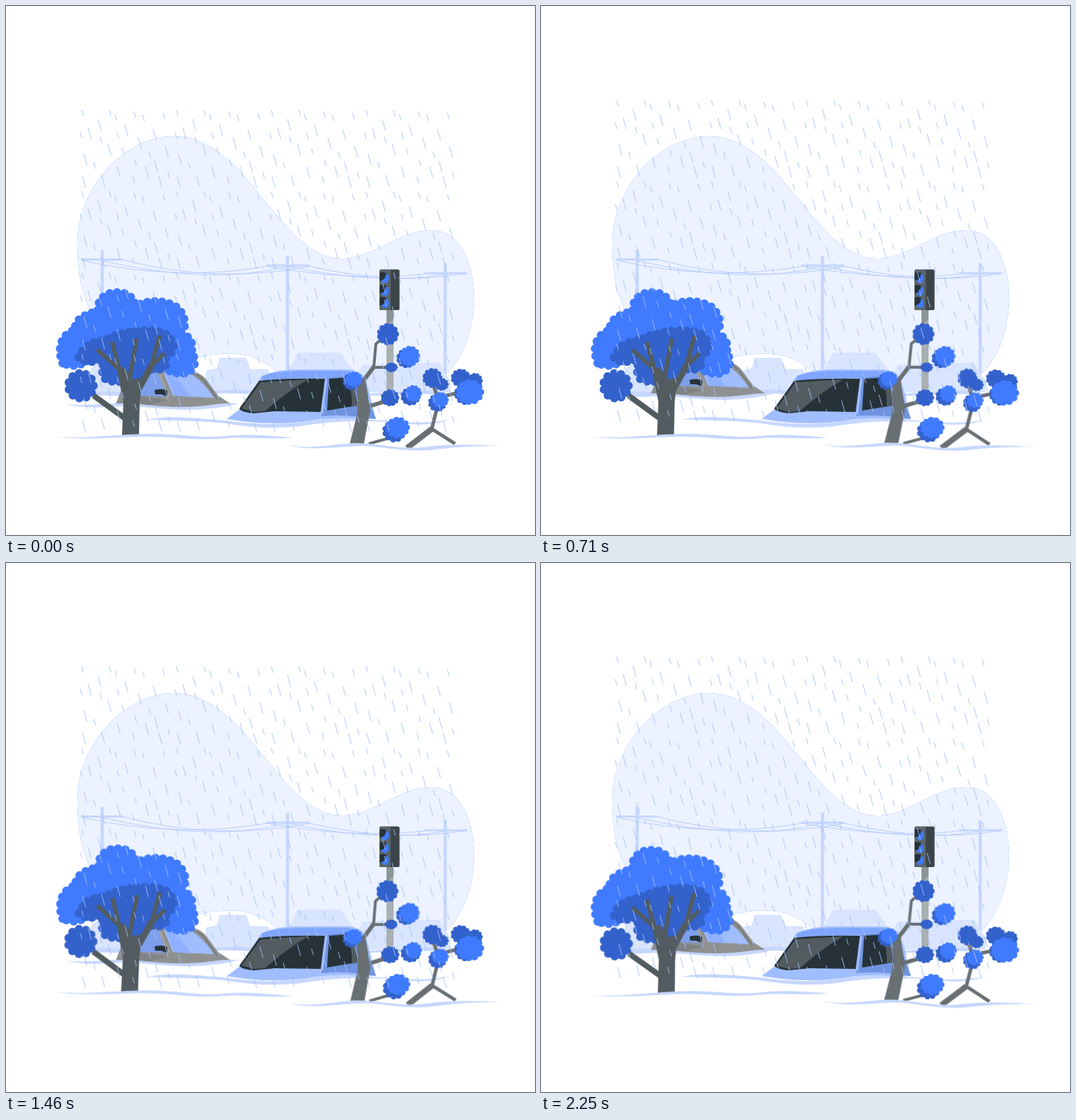
Recreate the animation shown at these times as an HTML page without scripts. Size 748x748 px, loop 2.29 s.

```html
<!DOCTYPE html>
<html lang="en">
<head>
<meta charset="utf-8">
<title>Flooded street in the rain</title>
<style>
html, body { margin: 0; width: 100%; height: 100%; overflow: hidden; background: #fff; }
svg { display: block; width: 100vw; height: 100vh; }

.float, .sway { animation: 2290ms linear infinite; }
.float { animation-name: float; }
.car { animation-name: sway-now; transform-origin: 411px 551px; }
.shrubs { animation-name: sway-soon; transform-origin: 549px 540px; }
.tree { animation-name: sway-late; transform-origin: 239px 507px; }

/* 1500 ms cycles, cut off by the 2290 ms loop */
@keyframes float {
  0%, 65.502% { transform: translateY(0); }
  32.751%, 98.253% { transform: translateY(-15px); }
  100% { transform: translateY(-14.2px); }
}
@keyframes sway-now {
  0%, 98.253% { transform: rotate(0deg); }
  16.376%, 81.878% { transform: rotate(1deg); }
  49.127% { transform: rotate(-1deg); }
  100% { transform: rotate(-.107deg); }
}
@keyframes sway-soon {
  0%, 21.834% { transform: rotate(0deg); }
  38.21% { transform: rotate(1deg); }
  70.961% { transform: rotate(-1deg); }
  100% { transform: rotate(.773deg); }
}
@keyframes sway-late {
  0%, 43.668% { transform: rotate(0deg); }
  60.044% { transform: rotate(1deg); }
  92.795% { transform: rotate(-1deg); }
  100% { transform: rotate(-.56deg); }
}

.water { fill: #c6d7ff; }
.far { fill: #d9e5ff; stroke: #c9d9ff; stroke-width: .7; }
.pole { stroke: #c6d7ff; fill: none; }
.wire { stroke: #b8cdff; fill: none; }
.bright { fill: #407bff; stroke: #407bff; }
.dark { fill: #3362cc; stroke: #3362cc; }
.crown { stroke-width: 12; stroke-linecap: round; stroke-dasharray: 0 10.5; }
.wood { fill: none; stroke: #687074; stroke-linejoin: round; }
.trunk { stroke: #525c60; }
.drops { fill: none; stroke: #a6c1ff; stroke-width: .9; }
</style>
</head>
<body>
<svg viewBox="0 0 748 748">
  <defs>
    <path id="blob" d="M237,184C275,184 310,208 345,250C390,303 425,357 475,357C520,357 555,317 602,317C640,317 661,360 662,410C662,455 648,492 628,515C600,548 430,560 385,518C345,482 300,490 265,499C215,512 160,490 125,440C105,410 101,370 101,335C101,255 170,184 237,184Z"/>
    <g id="puff">
      <circle r=".84" stroke="none"/>
      <circle r=".76" fill="none" stroke-width=".5" stroke-linecap="round" pathLength="10" stroke-dasharray="0 1"/>
    </g>
    <path id="tile" class="drops" d="M3,4l2.500,9M42,4l2.500,9M50,10l2.500,9M77,6l2.500,9M89,11l2.500,9M118,8l2.500,9M1,36l2.500,9M29,42l2.500,9M60,58l2.500,9M98,63l2.500,9M20,78l2.500,9M125,92l2.500,9M75,98l2.500,9M53,36l2.500,9M78,74l2.500,9M12,29l4.500,16M64,25l4.500,16M104,31l4.500,16M83,43l4.500,16M40,52l4.500,16M121,55l4.500,16M6,66l4.500,16M53,84l4.500,16M93,84l4.500,16M31,96l4.500,16M112,98l4.500,16M26,17l4.500,16M106,76l4.500,16M4,98l4.500,16"/>
    <g id="row">
      <use href="#tile"/><use href="#tile" x="134"/><use href="#tile" x="268"/><use href="#tile" x="402"/>
    </g>
  </defs>

  <use href="#blob" fill="#407bff"/>
  <use href="#blob" fill="#fff" opacity=".9"/>

  <g class="pole" stroke-width="4.500">
    <path d="M136,345V520M398,353V518M621,364V520"/>
    <path stroke-width="3" d="M106,358.500H166M368,367H429M591,378H652"/>
  </g>
  <g class="wire">
    <path d="M108,360Q245,390 369,368M136,360Q290,396 398,368M166,359Q300,394 429,368"/>
    <path d="M369,368Q490,390 591,379M398,368Q530,396 621,379M429,368Q550,396 651,378"/>
  </g>

  <g class="far">
    <path d="M283,516L298,513L303,498H339L345,514H370L374,524V547H283Z"/>
    <path d="M395,517L404,509L413,491H473L487,511L496,518V545H395Z"/>
    <path d="M488,535L505,508L612,505L628,530V546H488Z"/>
    <path d="M112,546L121,512L134,502H170V550H112Z"/>
    <path fill="none" d="M305,523H346V546M519,508V543"/>
  </g>
  <path class="water" d="M105,549Q140,541 175,548T270,547T350,545Q440,553 530,547T620,546T693,547Q650,550 610,549T520,551T350,549T175,552Z"/>

  <path fill="#a9b0b2" d="M538,428h10v120h-10z"/>
  <path fill="#8c9497" d="M538,428h10v14l-10,12z"/>
  <rect x="528" y="372.500" width="28.500" height="57.500" rx="2.500" fill="#3b4549"/>
  <path fill="#5b6569" d="M530,373h14v57h-14q-2,0-2-2v-53q0-2 2-2z"/>
  <g id="lamp">
    <ellipse cx="536" cy="385" rx="5.500" ry="7" fill="#407bff"/>
    <path fill="#263238" d="M528.500,377q7-2 10,2q-2,0-2,4q-2,5-8,5z"/>
  </g>
  <use href="#lamp" y="18"/>
  <use href="#lamp" y="35"/>

  <g class="float">
    <path fill="#8f9191" d="M155,563L165,538L183,520Q220,514 260,516Q277,518 286,532L300,551L317,562L283,567H200Z"/>
    <path fill="#7d9fec" d="M168,542L188,521L215,519L228,552L190,551Z"/>
    <path fill="#a0bdff" d="M223,519Q245,517 258,519Q277,528 294,554L236,551Z"/>
    <path fill="#8fb0ff" d="M226,520L236,519L262,553L238,551Z"/>
    <path fill="none" stroke="#9ca1a3" stroke-width="4" d="M217,517Q221,535 231,552"/>
    <path fill="none" stroke="#747a7c" stroke-width="2" d="M258,517Q274,520 284,535L299,556"/>
    <path fill="#263238" d="M210,543q12-3 18,1v8l-9-3h-8z"/>
    <path fill="#7f8384" d="M155,562L190,552L230,557L200,565Z"/>
    <path class="water" d="M84,563C120,567 150,559 190,563C230,568 260,568 290,564Q310,561 330,562Q300,570 262,571C220,571 190,565 160,566Q110,570 84,563Z"/>
  </g>

  <g class="sway car">
    <path fill="#a0bdff" d="M312,584L332,569L360,525Q375,515 410,514H482Q503,515 509,529L523,584L445,584Q380,596 312,584Z"/>
    <path fill="#7fa5ff" d="M362,523Q385,515 430,516H485L497,524L445,526Q390,526 362,530Z"/>
    <path fill="#6f93df" d="M446,580L452,526L495,522Q505,529 514,560L523,584Q480,577 446,580Z"/>
    <path fill="#263238" d="M330,569L358,530Q395,526 451,527L445,574L380,573L350,576Q331,574 330,569Z"/>
    <path fill="#525c60" d="M333,569L360,532L427,528Q395,547 366,573L350,574Z"/>
    <path fill="#263238" d="M457,527L489,525Q497,545 496,565L454,572Z"/>
    <path fill="#525c60" d="M482,526H489Q497,545 495,565L489,567Q490,545 482,526Z"/>
    <path fill="none" stroke="#a0bdff" stroke-width="3" d="M453,527L447,576"/>
    <path class="water" d="M199,585C230,578 270,583 310,586C350,592 390,593 430,586C470,580 500,584 530,586C570,590 600,590 627,585Q600,595 560,590C500,584 460,588 430,592C390,599 350,597 310,590C270,586 230,586 199,585Z"/>
  </g>

  <g class="sway shrubs">
    <g class="wood">
      <path fill="#687074" stroke="none" d="M486,619L497,575L496,528H508L513,557L515,572L506,619Z"/>
      <path stroke-width="6" d="M503,533L521,509M502,540L488,530M510,567L543,557"/>
      <path stroke-width="4" d="M520,511L523,478L534,468M519,511H546M513,619L545,610"/>
      <path stroke-width="8" d="M567,625L602,598"/>
      <path stroke-width="5" d="M635,619L602,598L612,558L602,530M622,551L652,544"/>
    </g>
    <g class="dark">
      <use href="#puff" transform="translate(540 464)scale(15.500)"/>
      <use href="#puff" transform="translate(545 511)scale(9 7)"/>
      <use href="#puff" transform="translate(566 498)scale(14)"/>
      <use href="#puff" transform="translate(488 531)scale(12)"/>
      <use href="#puff" transform="translate(543 554)scale(13 12)"/>
      <use href="#puff" transform="translate(572 552)scale(14 13)"/>
      <use href="#puff" transform="translate(549 601)scale(17 16)"/>
      <use href="#puff" transform="translate(603 526)scale(14)"/>
      <use href="#puff" transform="translate(616 535)scale(10 9)"/>
      <use href="#puff" transform="translate(610 561)scale(13)"/>
      <use href="#puff" transform="translate(643 526)scale(14 13)"/>
      <use href="#puff" transform="translate(663 530)scale(11)"/>
      <use href="#puff" transform="translate(650 548)scale(16)"/>
    </g>
    <g class="bright">
      <use href="#puff" transform="translate(571 495)scale(14.500)"/>
      <use href="#puff" transform="translate(492 528)scale(12 11)"/>
      <use href="#puff" transform="translate(576 548)scale(12)"/>
      <use href="#puff" transform="translate(554 596)scale(17 15)"/>
      <use href="#puff" transform="translate(614 557)scale(12 11)"/>
      <use href="#puff" transform="translate(656 546)scale(20 18)"/>
    </g>
    <path class="water" d="M397,621C430,627 460,620 490,618C530,618 550,627 590,624C630,618 670,621 702,622C660,622 630,624 600,628C560,631 530,622 500,622C460,624 430,629 397,621Z"/>
  </g>

  <g class="sway tree">
    <path class="bright crown" d="M80,505C70,480 82,462 98,458C95,445 112,434 130,432C128,412 145,404 158,405C172,405 180,412 184,424C200,414 232,416 244,428C255,440 255,455 248,462C262,468 266,480 262,490C274,505 262,520 250,520Q225,520 205,495H125C110,508 95,512 80,505Z"/>
    <path class="dark crown" d="M103,497C108,482 122,473 140,473C160,458 220,453 230,467C241,478 238,488 226,498C232,512 215,518 203,512C193,531 152,536 140,527C132,518 140,508 135,500C120,505 108,504 103,497Z"/>
    <use class="dark" href="#puff" transform="translate(106 537)scale(23.500)"/>
    <g class="wood trunk">
      <path fill="#525c60" stroke="none" d="M164,607L166,560L157,515L167,510L179,528L193,526L189,560L188,607Z"/>
      <path stroke-width="8" d="M168,583L124,551"/>
      <path stroke-width="9" d="M184,548L206,508"/>
      <path stroke-width="6" d="M164,517L129,486M160,513L150,475M174,530L185,470M205,511L217,466M205,510L224,491"/>
    </g>
    <path class="water" d="M70,609C120,612 150,606 200,605C250,604 270,612 310,608C350,604 380,609 407,610C370,614 340,608 300,612C260,614 230,608 190,609C150,610 110,614 70,609Z"/>
  </g>

  <g class="float">
    <use href="#row" x="104" y="143"/>
    <use href="#row" x="104" y="258"/>
    <use href="#row" x="104" y="373"/>
    <use href="#row" x="104" y="488"/>
  </g>
</svg>
</body>
</html>
```
